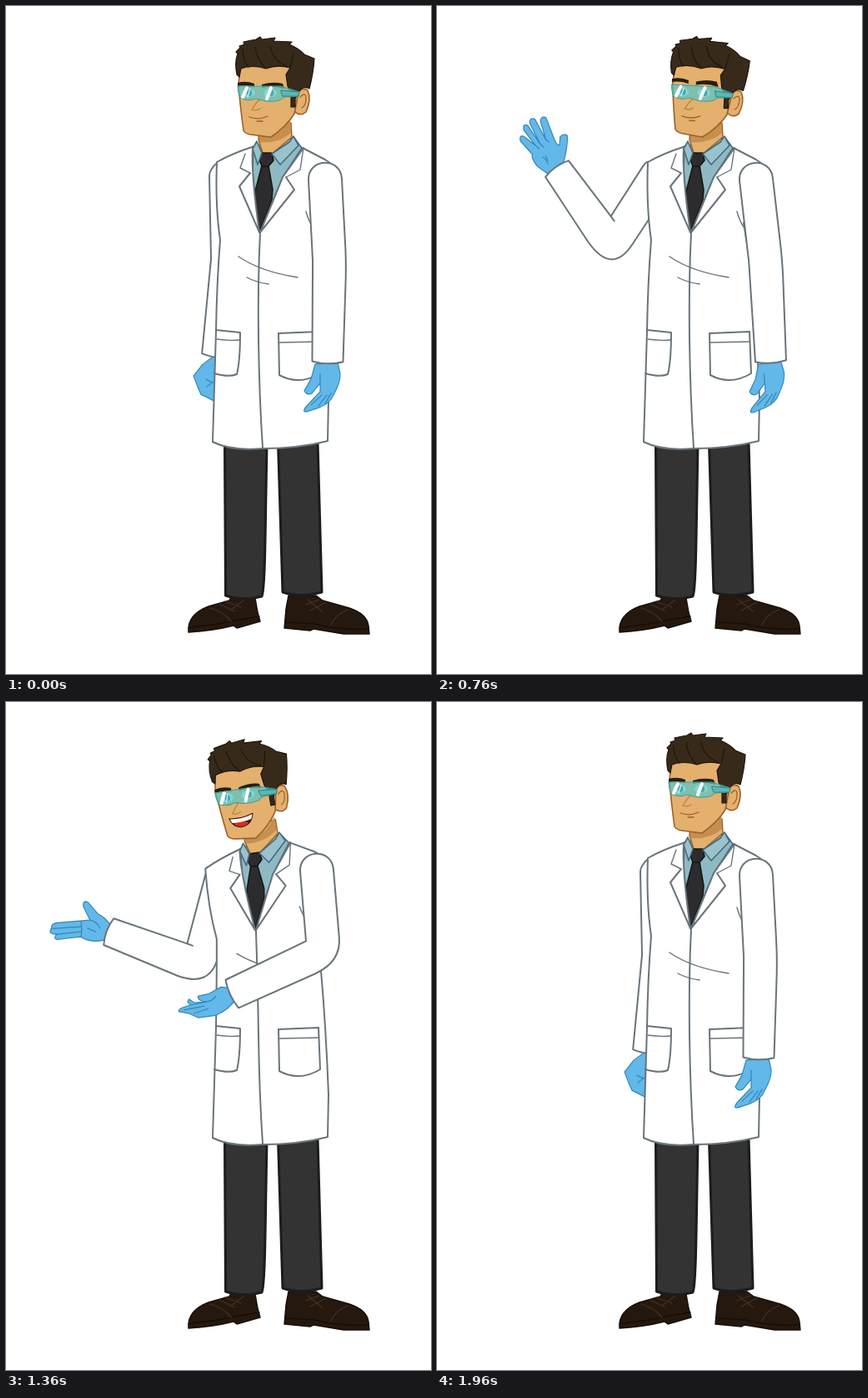
Write an HTML page with a canvas that moves like this. It is 510 px wide and 800 px high and loops after 2 s.

```html
<!DOCTYPE html>
<html>
<head>
<meta charset="utf-8">
<style>
html, body { margin: 0; width: 100%; height: 100%; overflow: hidden; background: #fff }
canvas { display: block }
</style>
</head>
<body>
<canvas id="stage" width="510" height="800"></canvas>
<script>
const ctx = document.getElementById('stage').getContext('2d');
const LOOP = 2000, RAD = Math.PI / 180;
const LINE = '#69747b', GLOVE = '#62b8e8', GLOVE_LINE = '#3287b8';
const SKIN = '#e4b06e', SKIN_LINE = '#9c6029', HAIR = '#382a1a', HAIR_LINE = '#20160b';

// moments at which the picture steps
const STEPS = [0, 80, 160, 240, 280, 360, 440, 520, 600, 680, 760, 840, 920, 1000, 1120,
  1200, 1280, 1360, 1440, 1520, 1600, 1680, 1720, 1760, 1800, 1840, 1920, 1960];

// time, left upper angle, left fore angle, left fore length, right upper, right fore, lean, head tilt
const KEYS = [
  [0, 89.4, 97, 115, 87, 91, 0, 0],
  [80, 89.4, 97, 115, 87, 91, 0, 0],
  [280, 124, 223.7, 109, 84, 87, 0, 2.5],
  [440, 123.5, 234.7, 113, 83.4, 87, 0, 3],
  [600, 124, 223.7, 109, 84, 87, 0, 2.5],
  [760, 123.5, 234.7, 113, 83.4, 87, 0, 3],
  [920, 114.6, 216.4, 111, 79.3, 111, .5, -4],
  [1120, 105.5, 201, 115, 85.2, 154.5, 1, -9],
  [1680, 105.5, 200.5, 115, 85.2, 156, 1, -9],
  [1800, 92, 108, 115, 86, 97, .1, -1],
  [1960, 89.4, 97, 115, 87, 91, 0, 0],
  [2000, 89.4, 97, 115, 87, 91, 0, 0]
];
const MOUTHS = [[0, 'shut'], [160, 'talk'], [240, 'smile'], [440, 'round'], [520, 'talk'],
  [600, 'shut'], [840, 'talk'], [1000, 'round'], [1200, 'talk'], [1360, 'smile'],
  [1440, 'round'], [1520, 'talk'], [1600, 'smile'], [1760, 'shut']];

// each hand: outline, inner lines, wrist position and forearm angle it is drawn at
const HANDS = {
  rest: ['M254,416 L248,419 L236,428 L225,442 L230,455 L234,464 L250,472 L262,450 Z',
    'M240,446 L248,450 M241,455 L248,449', 252, 417, 97],
  open: ['M121,219 L106,212 Q97,205 97,199 L80,186 Q77,179 83,180 L99,188 L82,173 Q78,165 85,166 L104,185 L87,163 Q85,156 92,157 L110,179 L99,158 Q99,151 105,153 L120,177 Q124,183 127,182 L126,172 Q129,167 134,169 Q137,180 136,198 L135,206 Z',
    'M110,200 Q114,201 118,207 M113,198 L117,203 M99,188 L104,191 M104,185 L109,188 M110,179 L114,181', 129.5, 210.5, 223.7],
  show: ['M125,265 Q118,256 111,253 L99,239 Q93,235 93,243 L101,260 L62,263 Q54,264 55,269 Q51,275 56,276 L61,277 Q56,282 62,283 L72,282 L90,280 Q102,288 118,284 Z',
    'M56,270 L90,268 M60,277 L90,274 M90,262 Q92,272 90,280 M101,260 Q110,262 113,270 M98,270 L108,274', 123.5, 274, 201],
  hang: ['M371,429 L366,447 L358,461 Q361,467 367,464 L377,452 L377,462 L360,480 Q355,487 361,486 L376,481 Q389,476 393,466 Q402,450 401,440 L398,427 Z',
    'M366,478 L379,466 M375,479 L385,466 M383,476 L390,464 M377,452 L377,441', 386, 426, 91],
  palm: ['M270,344 L258,343 L244,351 L231,354 Q229,360 241,361 L226,362 L220,358 Q216,361 222,365 Q206,369 208,373 L220,375 L231,380 L252,377 Q268,370 276,357 Z',
    'M214,371 L238,366 M226,375 L243,369 M222,365 L240,361 Q248,360 252,354', 271.5, 351, 154.5]
};

const HEAD = {
  ear: 'M349,106 Q355,96 362,101 Q367,112 360,127 Q353,133 346,126 Z',
  face: 'M281,72 L279,95 Q281,120 285,149 Q287,153 294,154 L318,157 Q336,145 346,129 L351,103 L340,70 Z',
  hair: 'M280,85 L277,82 Q274,68 278,57 L276,55 L281,50 L280,48 L286,46 L285,43 Q294,41 300,40 L305,37 L307,40 L323,38 L321,42 L343,43 L340,46 Q352,51 358,58 L370,63 Q369,80 364,99 Q356,95 351,103 L347,111 L347,121 L342,121 L342,104 L338,96 L336,82 L341,74 Q325,70 312,75 Q296,70 282,75 Z',
  strands: 'M284,52 Q284,66 291,73 M299,49 Q301,64 311,74 M317,48 Q320,65 337,72 M345,56 Q343,66 341,74',
  lens: 'M278,96 L330,96 L352,103 L351,108 L334,109 L328,113 Q315,116 304,112 L300,111 Q290,115 281,110 Q278,104 278,96 Z'
};

function shape(d, fill, stroke, width = 2) {
  const path = new Path2D(d);
  if (fill) { ctx.fillStyle = fill; ctx.fill(path); }
  if (stroke) { ctx.strokeStyle = stroke; ctx.lineWidth = width; ctx.stroke(path); }
}

function ellipse(x, y, rx, ry, fill) {
  ctx.beginPath();
  ctx.ellipse(x, y, rx, ry, 0, 0, 7);
  ctx.fillStyle = fill;
  ctx.fill();
}

// shift a point by a list of [vector, factor] pairs
const add = (p, ...parts) => parts.reduce((s, [v, k]) => [s[0] + v[0] * k, s[1] + v[1] * k], p);
const dir = deg => [Math.cos(deg * RAD), Math.sin(deg * RAD)];
const side = ([x, y]) => [-y, x];

function poseAt(t) {
  const i = KEYS.findIndex(k => k[0] > t), a = KEYS[i - 1], b = KEYS[i];
  const f = (t - a[0]) / (b[0] - a[0]);
  return a.map((v, j) => v + (b[j] - v) * f);
}

function hand(name, wrist, angle) {
  const [outline, lines, x, y, base] = HANDS[name];
  ctx.save();
  ctx.translate(...wrist);
  ctx.rotate((angle - base) * RAD);
  ctx.translate(-x, -y);
  shape(outline, GLOVE, GLOVE_LINE, 1.2);
  shape(lines, null, GLOVE_LINE, 1.2);
  ctx.restore();
}

// cap(shoulder, u, n) returns the start of the path, ending on the inner side of the shoulder
function arm(shoulder, a1, len1, a2, len2, cuff, handName, cap) {
  const u = dir(a1), f = dir(a2), n = side(u), m = side(f);
  const elbow = add(shoulder, [u, len1]), wrist = add(elbow, [f, len2]);
  const k = 20 / (1 + n[0] * m[0] + n[1] * m[1]);
  const crease = add(elbow, [n, k], [m, k]);
  const top = add(wrist, [m, cuff]), low = add(wrist, [m, -cuff]);
  hand(handName, wrist, a2);
  shape(`${cap(shoulder, u, n)} L${crease} L${top} Q${add(wrist, [f, 5])} ${low}
    L${add(elbow, [m, -20], [f, 20])} Q${add(elbow, [n, -k], [m, -k])} ${add(elbow, [n, -20], [u, -15])}
    L${add(shoulder, [n, -20])} Z`, '#fff', LINE);
  if (a2 - a1 > 75) shape(`M${crease} L${add(crease, [f, -7])}`, null, LINE);
}

function legs() {
  const black = '#1c1c1c', pants = '#333', shoe = '#25190f', dark = '#170e07', lace = '#46301f';
  shape('M219,750 Q217,729 243,719 L268,712 L271,706 L299,709 L302,726 L305,737 L277,745 L273,742 Q250,748 219,750 Z', shoe, dark, 1.4);
  shape('M334,745 L336,722 L339,706 L372,706 L380,712 L412,721 Q433,728 435,742 L436,752 L405,752 L369,746 L365,748 Z', shoe, dark, 1.4);
  shape('M220,744 Q250,742 274,736 L304,731 M335,738 L370,740 Q400,748 435,746', null, dark, 1.5);
  shape('M256,716 L274,725 M263,713 L282,720 M270,723 L286,711 M245,721 Q262,726 270,737 M365,724 L384,714 M360,717 L376,711 M362,711 L379,725 M390,741 Q395,729 410,723', null, lace, 1.3);
  shape('M262.5,524 L263.5,706 Q285,713 307,707 Q310,700 311,640 L313,524 Z', pants, black, 3);
  shape('M326.5,524 L332,702 Q352,709 379,702 L374,522 Z', pants, black, 3);
}

function torso(lean) {
  // the chest leans from the waist up
  const bend = d => d.replace(/([\d.]+),([\d.]+)/g, (_, x, y) => {
    const k = lean * Math.max(0, (320 - y) / 135);
    return [x - 14 * k, +y + (5 - (x - 310) * .14) * k];
  });
  const part = (d, ...style) => shape(bend(d), ...style);
  part('M298,168 Q270,177 253,187 Q251,240 257,280 Q253,330 252,390 L248,522 Q270,533 307,530 Q350,530 386,521 L387,470 Q384,390 378,322 L368,260 L402,202 Q396,192 383,184 L356,170 Z', '#fff', LINE);
  part('M305,271 Q302,330 303,400 Q304,470 308,529', null, LINE);
  part('M252,388 L281,391 Q281,425 277,441 Q267,445 250,440', null, LINE);
  part('M327,392 L375,390 L377,440 Q352,455 328,442 Z', null, LINE);
  part('M253,399 Q267,401 280,400 M328,403 L375,402 M279,300 Q305,318 350,325 M289,325 Q300,331 315,333 M360,246 Q363,258 369,266', null, LINE, 1.4);

  const collar = '#9bc2cc', edge = '#456c7b';
  part('M297,168 L296,200 L304,271 L332,205 L355,170 L346,158 Z', '#8fbac5', edge, 1.5);
  part('M304,145 L303,160 L308,176 L319,177 L343,157 L342,140 Z', SKIN, SKIN_LINE, 1.5);
  part('M304,155 L318,157 Q333,150 341,136 L342,152 Q328,165 304,163 Z', '#c78f4f');
  part('M307,191 L299,222 L300,245 L304,271 L319,232 L320,220 L315,191 Z', '#2c2c2e', '#151515', 1.5);
  part('M306,176 L319,176 L321,185 L315,192 L307,192 L304,184 Z', '#2c2c2e', '#151515', 1.5);
  part('M301,162 L296,171 L302,190 L307,176 Z', collar, edge, 1.6);
  part('M345,156 L351,167 L329,190 L319,177 L340,163 Z', collar, edge, 1.6);
  part('M296,170 Q294,200 304,271 L280,216 L293,200 L281,194 L287,177 Z', '#fff');
  part('M296,170 Q294,200 304,271 L280,216 L293,200', null, LINE);
  part('M357,170 L332,205 L305,271 L346,220 L336,205 L353,196 Z', '#fff');
  part('M357,170 L332,205 L305,271 L346,220 L336,205', null, LINE);
  part('M293,200 L281,194 L287,177 M336,205 L353,196 L357,170', null, LINE, 1.4);
}

function mouth(kind) {
  const dark = '#3d150f', red = '#d6301e';
  if (kind === 'shut') {
    shape('M292,133 Q303,137 314,132 M301,138 L308,138', null, SKIN_LINE, 1.3);
  } else if (kind === 'round') {
    ellipse(305, 133, 5, 6, dark);
    ellipse(305, 136, 3.6, 2.6, red);
  } else {
    const wide = kind === 'smile';
    const outline = wide ? 'M290,129 Q304,132 319,127 Q316,141 303,141 Q293,140 290,129 Z'
      : 'M292,135 Q303,129 315,132 Q315,141 304,142 Q293,142 292,135 Z';
    ctx.save();
    ctx.clip(new Path2D(outline));
    shape(outline, dark);
    ellipse(303, wide ? 140 : 142, 10, wide ? 6 : 4, red);
    shape(wide ? 'M286,124 H322 V132 Q304,137 286,134 Z' : 'M286,126 H322 V134 Q304,135 286,138 Z', '#fff');
    ctx.restore();
    shape(outline, null, dark, 1);
  }
}

function head(t, lean, tilt) {
  ctx.save();
  ctx.translate(318 - 17 * lean, 165 + 6 * lean);
  ctx.rotate(tilt * RAD);
  ctx.translate(-318, -165);
  shape(HEAD.ear, SKIN, SKIN_LINE, 1.6);
  shape('M353,109 Q360,102 360,111 Q360,119 355,122', null, SKIN_LINE, 1.2);
  shape(HEAD.face, SKIN, SKIN_LINE, 1.6);
  shape(HEAD.hair, HAIR, HAIR_LINE, 1.2);
  shape(HEAD.strands, null, HAIR_LINE, 1.3);
  shape('M304,112 Q299,117 295,124 Q300,126 305,123', null, '#bd8243', 1.3);

  const lift = t >= 200 && t < 820 ? -3 : 0;
  ctx.translate(0, lift);
  shape('M278,92 Q288,89 298,93 L298,97 Q288,94 278,96 Z M307,94 Q320,90 332,93 L334,99 Q320,95 307,98 Z', '#291d12');
  ctx.translate(0, -lift);

  const blink = t >= 1080 && t < 1200;
  for (const x of [291, 317]) {
    if (blink) shape(`M${x - 8},105 Q${x},109 ${x + 8},104`, null, HAIR, 1.6);
    else {
      ellipse(x, 104, 8, 5, '#e8fbff');
      ellipse(x + 1, 104, 3.2, 4, '#245f78');
    }
  }
  shape(HEAD.lens, 'rgba(84,198,200,.7)', '#3f9f9c', 1);
  shape('M330,101 L352,103 L351,108 L332,108 Z', '#5bb8b4', '#2f8786', 1);
  shape('M284,109 L289,98 M313,111 L318,98', null, '#fff', 4);
  shape('M290,109 L293,99', null, '#d7f4f2', 1.2);
  mouth(MOUTHS.findLast(m => m[0] <= t)[1]);
  ctx.restore();
}

function draw(now) {
  const t = STEPS.findLast(s => s <= now % LOOP);
  const [, a1, a2, fore, b1, b2, lean, tilt] = poseAt(t);
  ctx.fillStyle = '#fff';
  ctx.fillRect(0, 0, 510, 800);
  ctx.lineJoin = ctx.lineCap = 'round';

  const leftHand = t < 160 || t >= 1760 ? 'rest' : t < 1000 ? 'open' : 'show';
  arm([265 - 4 * lean, 203 + 4 * lean], a1, 101 + 12 * lean, a2, fore, 17, leftHand, (s, u, n) =>
    `M${254 - 14 * lean},${187 + 13 * lean} Q${add(s, [n, 21], [u, -7])} ${add(s, [n, 21])}`);
  legs();
  torso(lean);
  head(t, lean, tilt);
  arm([383 - 10 * lean, 208 - 6 * lean], b1, 97, b2, 121, 18.5, t >= 1000 && t < 1760 ? 'palm' : 'hang', (s, u, n) =>
    `M${add(s, [n, -20])} C${add(s, [n, -20], [u, -27])} ${add(s, [n, 20], [u, -27])} ${add(s, [n, 20])}`);
}

const start = performance.now();
function tick() {
  draw(performance.now() - start);
  requestAnimationFrame(tick);
}
tick();
</script>
</body>
</html>
```
